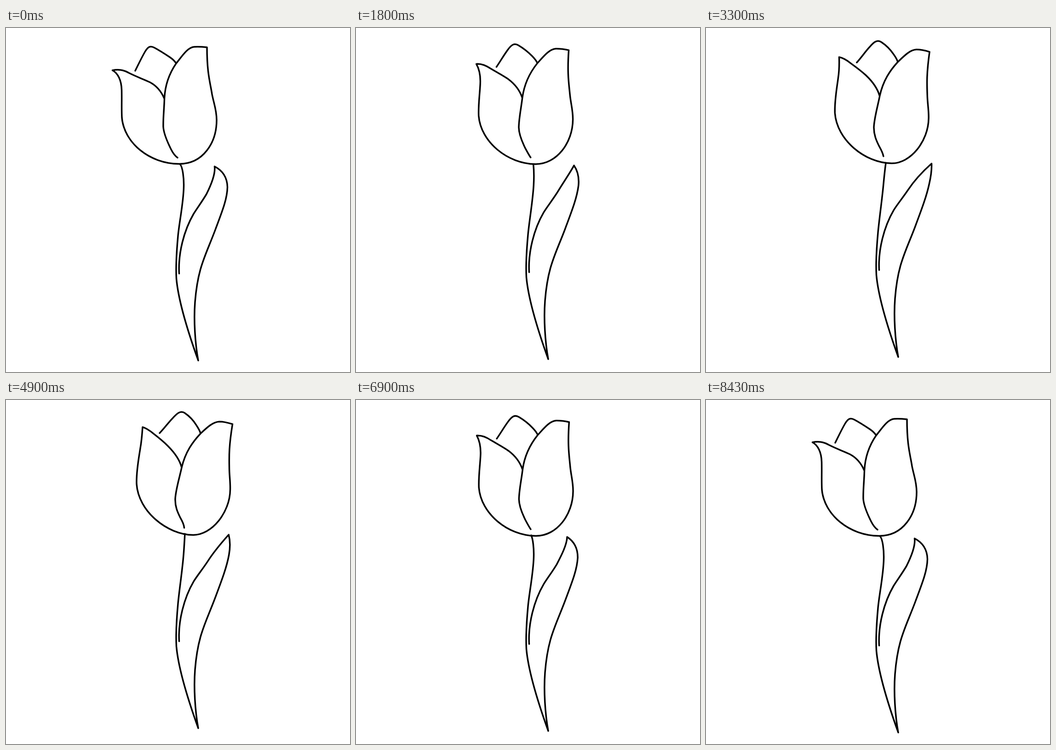
An HTML page for the animation above (8510 ms loop, 748 by 748 pixels).

```html
<!DOCTYPE html>
<html lang="en">
<head>
<meta charset="utf-8">
<title>Swaying tulip</title>
<style>
  html, body { margin: 0; width: 100%; height: 100%; overflow: hidden; background: #fff; }
  svg { display: block; width: 100%; height: 100%; }
  path { fill: none; stroke: #000; stroke-width: 3.5; stroke-linecap: round; stroke-linejoin: round; }
</style>
</head>
<body>
<svg viewBox="0 0 748 748">
  <path id="stem"/>
  <path id="bloom"/>
</svg>
<script>
const LOOP = 8510;
const LAST_STEP = 169;
const RISE = 9.5; // how far the whole drawing lifts, in px

// Each part is blended between a resting pose and a swayed pose.
const bloom = {
  el: document.getElementById('bloom'),
  rest: `M344 153 C338 139 328 126 313 118 C298 111 286 107 268 98 C256 91 244 89 231.5 92
    C243 98 251 113 251.5 135 C252 160 251 175 252 195 C257 250 312 295 376 295.5
    C428 296 458 250 458 200 C458 178 452 165 448 144 C444 118 437 100 437 42
    C428 41 418 40.5 409 41 C395 42 383 61 370 77 C357 96 346 120 344.5 153
    C344 175 341.5 195 342 215 C343 230 352 250 359 264 C363 272 366 277 373 282
    M281 93 C288 79 294 66 302 52 C309 40 314 38 323 43 C336 50 348 58 357 64 C362 67.5 367 72 370 77`,
  sway: `M382 156.3 C378 140.3 366 123.3 352 109.3 C341 98.3 332 91.3 321 82.8 C312 75.3 304 70.3 297 68.3
    C296 83.3 295 98.3 292 114.3 C289 134.3 283 164.3 284 192.3 C288 251.3 350 302.3 407 302.8
    C447 303.3 487 254.3 487.5 204.3 C488 186.3 485.5 174.3 485.5 154.3 C485 129.3 485 107.3 492.5 61.8
    C483 58.8 474 56.3 464 56.3 C450 56.8 437 69.3 423 82.3 C406 100.3 390 122.3 382 156.3
    C377 179.3 369 204.3 368 224.3 C367.5 241.3 373 253.3 379 265.3 C383 272.3 387 280.3 387.5 287.3
    M334 81.3 C344 71.3 353 58.3 363 48.3 C372 38.3 380 31.3 389 37.8 C400 45.3 408 54.3 414 64.3 C418 70.3 422 76.3 423 82.3`,
  keys: [[0, 0], [17, .1], [36, .46], [53, .75], [66, .885], [78, .965], [89, 1.005], [98, 1],
    [107, .955], [114, .905], [125, .75], [138, .475], [143, .36], [161, .04], [169, 0]]
};

const stem = {
  el: document.getElementById('stem'),
  rest: `M379 297 C384 303 387 325 386.5 345 C386 380 377 420 374 452 C371 485 369 520 370.5 545
    C374 585 390 645 418 723 C411 685 408 635 411 596 C417 520 434 495 455 439
    C470 399 481 372 481.5 346 C481 325 471 310 453.5 301 C456 318 446 341 436 361
    C426 378 416 391 408 404 C387 440 374 490 376.5 534`,
  sway: `M391 301 C389 316 387.5 330 386 346 C383 380 377 420 374 452 C371 485 369 520 370.5 545
    C374 585 390 645 418 723 C411 685 408 635 411 596 C417 520 434 495 455 439
    C470 399 480 372 485.5 346 C489 331 491 316 490.5 302.5 C473 318 455 336 438.5 361
    C427 378 416 391 408 404 C387 440 374 490 376.5 534`,
  keys: [[0, 0], [18, .16], [36, .555], [52, .87], [66, 1], [75, 1.03], [84, 1],
    [98, .83], [114, .53], [138, .15], [155, .03], [169, 0]]
};

const riseKeys = [[0, 0], [17, .09], [36, .31], [53, .63], [66, .81], [77, .94], [89, 1], [98, .985],
  [107, .94], [114, .87], [125, .65], [138, .36], [143, .28], [161, .06], [169, 0]];

// Smooth curve through the keys, at rest on both ends.
function ease(keys, x) {
  const slope = i => {
    const a = keys[i - 1], b = keys[i + 1];
    return a && b ? (b[1] - a[1]) / (b[0] - a[0]) : 0;
  };
  let i = 0;
  while (i < keys.length - 2 && x > keys[i + 1][0]) i++;
  const [x0, y0] = keys[i], [x1, y1] = keys[i + 1];
  const w = x1 - x0, u = (x - x0) / w, v = 1 - u;
  return y0 * (1 + 2 * u) * v * v + y1 * (3 - 2 * u) * u * u
    + w * u * v * (slope(i) * v - slope(i + 1) * u);
}

const numbers = d => d.match(/[\d.]+/g).map(Number);
for (const part of [bloom, stem]) {
  part.from = numbers(part.rest);
  part.to = numbers(part.sway);
}

function pose(part, step, lift) {
  const k = ease(part.keys, step);
  let i = 0;
  const d = part.rest.replace(/[\d.]+/g, () => {
    const n = part.from[i] + (part.to[i] - part.from[i]) * k;
    return (i++ % 2 ? n - lift : n).toFixed(2);
  });
  part.el.setAttribute('d', d);
}

// Steps alternate between 30 ms and 70 ms.
function stepAt(t) {
  return Math.min(LAST_STEP, 2 * Math.floor(t / 100) + (t % 100 >= 30 ? 1 : 0));
}

function draw(now) {
  const step = stepAt(now % LOOP);
  const lift = RISE * ease(riseKeys, step);
  pose(bloom, step, lift);
  pose(stem, step, lift);
}

const start = performance.now();
function tick() {
  draw(performance.now() - start);
  requestAnimationFrame(tick);
}
tick();
</script>
</body>
</html>
```
